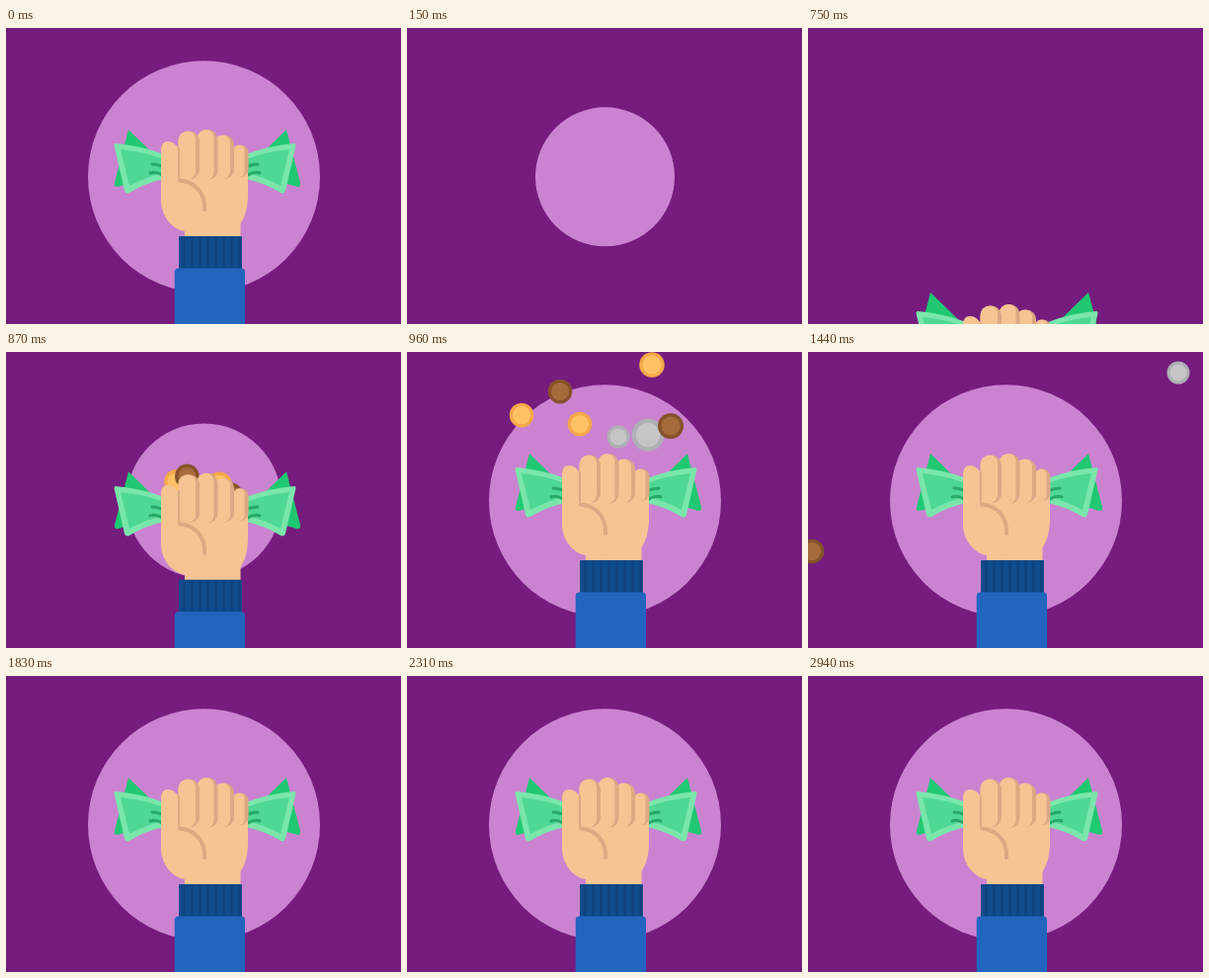
An HTML page with a canvas for the animation above (2970 ms loop, 400 by 300 pixels).

```html
<!DOCTYPE html>
<html lang="en">
<head>
<meta charset="utf-8">
<title>Fist with cash</title>
<style>
html, body { margin: 0; width: 100%; height: 100%; overflow: hidden; background: #761c7e; }
canvas { display: block; }
</style>
</head>
<body>
<canvas id="stage" width="400" height="300"></canvas>
<script>
const ctx = document.getElementById('stage').getContext('2d');
const LOOP = 2970, STEP = 30;
const SKIN = '#f6c492', SHADE = '#dba982';

const METAL = {
  gold: ['#f3a84a', '#fec265'],
  brown: ['#85522a', '#a56b3a'],
  silver: ['#aeb0b5', '#c5c5c8']
};

// metal, radius, launch time, position at 960 ms, position at 1440 ms
const COINS = [
  ['gold', 12.3, 850, 116, 64, -185, 180],
  ['brown', 12.3, 850, 155, 40, 4, 202],
  ['gold', 12.3, 875, 175, 73, -20, 200],
  ['silver', 11.5, 885, 214, 86, 375, 21],
  ['silver', 16.5, 885, 244, 84, 440, 150],
  ['brown', 13, 865, 267, 75, 480, 200],
  ['gold', 12.8, 860, 248, 13, 418, -21]
];

const clamp = v => Math.min(1, Math.max(0, v));

function disc(x, y, r, color) {
  ctx.fillStyle = color;
  ctx.beginPath();
  ctx.arc(x, y, r, 0, Math.PI * 2);
  ctx.fill();
}

function shape(d, color) {
  ctx.fillStyle = color;
  ctx.fill(new Path2D(d));
}

function box(x, y, w, h, radii, color) {
  ctx.fillStyle = color;
  ctx.beginPath();
  ctx.roundRect(x, y, w, h, radii);
  ctx.fill();
}

function line(d, color, width) {
  ctx.strokeStyle = color;
  ctx.lineWidth = width;
  ctx.lineCap = 'round';
  ctx.stroke(new Path2D(d));
}

function at(dy, draw) {
  ctx.save();
  ctx.translate(0, dy);
  draw();
  ctx.restore();
}

function mirrored(width, draw) {
  draw();
  ctx.save();
  ctx.translate(width, 0);
  ctx.scale(-1, 1);
  draw();
  ctx.restore();
}

// Parabola through the launch point and two known heights
function coin([metal, r, start, x1, y1, x2, y2], t) {
  if (t < start) return;
  const y0 = 150, s = t - start, a = 960 - start, b = 1440 - start;
  const va = (y1 - y0) / a, vb = (y2 - y0) / b;
  const g = (vb - va) / (b - a), v = va - g * a;
  const x = x1 + (x2 - x1) * (t - 960) / 480;
  const y = y0 + v * s + g * s * s;
  disc(x, y, r, METAL[metal][0]);
  disc(x, y, r * 0.74, METAL[metal][1]);
}

function backBill() {
  shape('M124 103 L164 142 L150 150 L113 161 Q109 161 110 157 Z', '#20c872');
}

function frontBill() {
  shape('M111 117 Q136 119 160 128 V153 Q141 157 124 167.5 Q121 168 120 165 L109.5 119 Q109.5 117 111 117 Z', '#7ae6ab');
  shape('M116 123 Q138 125 160 133 V147 Q141 151 125 160 Z', '#4fd795');
  line('M148 138 Q152 138 158 140', '#27a969', 3);
  line('M146 147 Q151 145 158 149', '#27a969', 3);
}

function finger(x, y, w, bottom) {
  box(x, y, w, bottom - y, w / 2, SHADE);
  box(x, y, w - 4, bottom - y, [w / 2 - 1, w / 2 - 2, w / 2 - 2, w / 2 - 1], SKIN);
}

function arm() {
  box(181, 180, 56.5, 34, 0, SKIN);
  box(175, 211, 64, 35, 1, '#104b8c');
  for (let x = 179; x < 238; x += 8) box(x, 212, 3, 32, 0, '#0e4380');
  box(170.7, 243.5, 71.3, 70, [4, 4, 0, 0], '#2364bf');
}

function fist() {
  shape('M157 124 Q157 115 164 115 Q171 115 175 123 L178 130 H245 V172 Q244 189 237.5 198 L181 206 C168 204 157 190 157 175 Z', SKIN);
  finger(230, 118.5, 15.5, 151);
  finger(211, 108.5, 20, 153);
  finger(193.5, 103, 21, 154);
  finger(174.5, 104.5, 21.5, 153.5);
  line('M175 122 V152', SHADE, 2);
  line('M176 154.5 C192 156 202 168 201 184', SHADE, 4);
}

function hand(lift) {
  at(165 * lift, () => mirrored(408, backBill));
  at(170 * lift, () => mirrored(403, frontBill));
  at(177 * lift, () => { arm(); fist(); });
}

function backdrop(scale) {
  if (scale > 0) disc(200.5, 150.8, 117.5 * scale, '#cb83d1');
}

function draw(t) {
  ctx.fillStyle = '#761c7e';
  ctx.fillRect(0, 0, 400, 300);
  if (t < 30) {
    backdrop(1);
    hand(0);
  } else if (t < 750) {
    backdrop(clamp(1 - (t - 30) / 300));
  } else {
    const k = clamp((t - 750) / 180);
    backdrop(k);
    COINS.forEach(c => coin(c, t));
    hand((1 - k) ** 2);
  }
}

const begin = performance.now();
function tick() {
  const ms = Math.max(0, performance.now() - begin) % LOOP;
  draw(Math.floor(ms / STEP) * STEP);
  requestAnimationFrame(tick);
}
tick();
</script>
</body>
</html>
```
